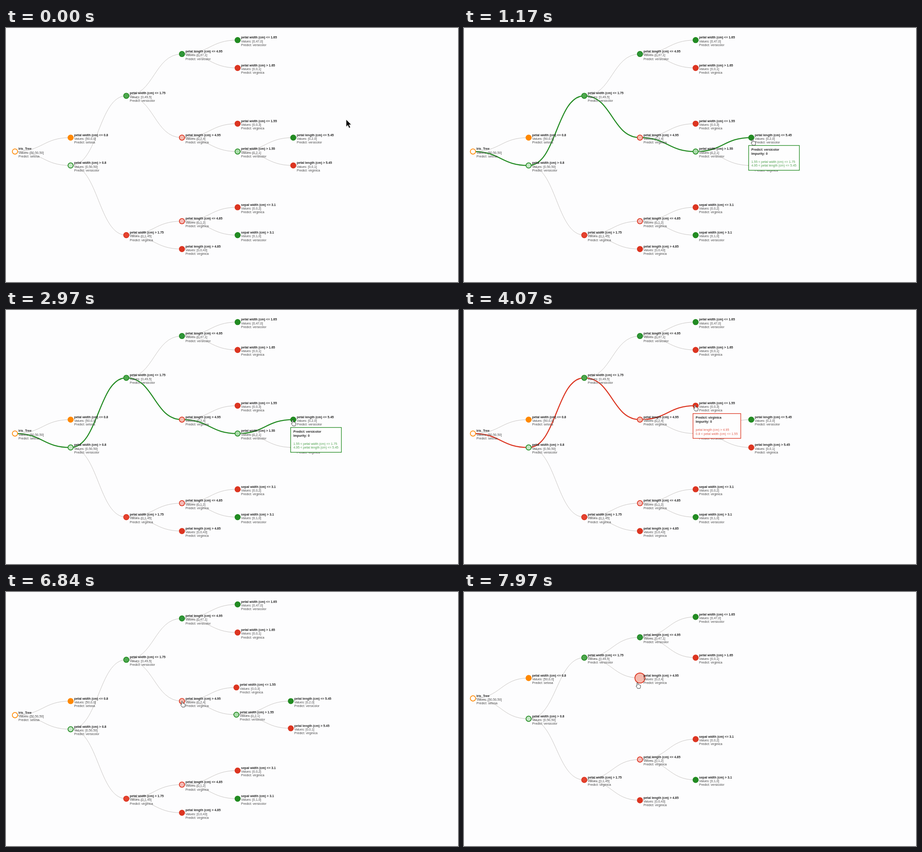
Recreate the animation shown at these times as an HTML page. Size 998 by 561 pixels, loop 8000 ms.

```html
<!DOCTYPE html>
<html lang="en">
<head>
<meta charset="utf-8">
<title>Decision tree</title>
<style>
  html, body { margin: 0; width: 100%; height: 100%; overflow: hidden; background: #fdfdfe; }
  svg { display: block; width: 100%; height: 100%; }
  text { font: 7px "Liberation Sans", Arial, sans-serif; fill: #484848; white-space: pre; }
  .b { font-weight: bold; fill: #222; }
  .link { fill: none; stroke: #c9c6c4; stroke-width: 1; }
</style>
</head>
<body>
<svg id="stage" viewBox="0 0 998 561" preserveAspectRatio="none"></svg>
<script>
const LOOP = 8000, CLICK = 6708, FOLD = 750;
const GREEN = '#228b22', RED = '#dc3521', ORANGE = '#ff8800';
const COLORS = { setosa: ORANGE, versicolor: GREEN, virginica: RED };
const stage = document.getElementById('stage');

function add(parent, tag, attrs = {}, text) {
  const el = document.createElementNS('http://www.w3.org/2000/svg', tag);
  set(el, attrs);
  if (text) el.textContent = text;
  parent.appendChild(el);
  return el;
}
function set(el, attrs) {
  for (const k in attrs) el.setAttribute(k, attrs[k]);
}

// parent, depth, row when open, row when folded, title, values, class, fill (none = leaf)
const nodes = [
  [-1, 0, 8, 4, 'Iris_Tree', '50,50,50', 'setosa', '#ffffff'],
  [0, 1, 7, 3, 'petal width (cm) <= 0.8', '50,0,0', 'setosa'],
  [0, 1, 9, 5, 'petal width (cm) > 0.8', '0,50,50', 'versicolor', '#c4e6c4'],
  [2, 2, 4, 2, 'petal width (cm) <= 1.75', '0,49,5', 'versicolor', '#4fa84f'],
  [2, 2, 14, 8, 'petal width (cm) > 1.75', '0,1,45', 'virginica', '#e5432f'],
  [3, 3, 1, 1, 'petal length (cm) <= 4.95', '0,47,1', 'versicolor', '#2f953a'],
  [3, 3, 7, 3, 'petal length (cm) > 4.95', '0,2,4', 'virginica', '#f5baae'],
  [4, 3, 13, 7, 'petal length (cm) <= 4.85', '0,1,2', 'virginica', '#f5bab6'],
  [4, 3, 15, 9, 'petal length (cm) > 4.85', '0,0,43', 'virginica'],
  [5, 4, 0, 0, 'petal width (cm) <= 1.65', '0,47,0', 'versicolor'],
  [5, 4, 2, 2, 'petal width (cm) > 1.65', '0,0,1', 'virginica'],
  [6, 4, 6, 3, 'petal width (cm) <= 1.55', '0,0,3', 'virginica'],
  [6, 4, 8, 3, 'petal width (cm) > 1.55', '0,2,1', 'versicolor', '#aadcaa'],
  [7, 4, 12, 6, 'sepal width (cm) <= 3.1', '0,0,2', 'virginica'],
  [7, 4, 14, 8, 'sepal width (cm) > 3.1', '0,1,0', 'versicolor'],
  [12, 5, 7, 3, 'petal length (cm) <= 5.45', '0,2,0', 'versicolor'],
  [12, 5, 9, 3, 'petal length (cm) > 5.45', '0,0,1', 'virginica']
].map(([up, depth, row, folded, title, values, kind, fill]) =>
  ({ up, depth, row, folded, title, values, kind, fill, color: COLORS[kind] }));

const folding = nodes[6];
const rules = new Map([
  [nodes[15], { w: 112, lines: ['1.55 < petal width (cm) <= 1.75', '4.95 < petal length (cm) <= 5.45'] }],
  [nodes[11], { w: 105.5, lines: ['petal length (cm) > 4.95', '0.8 < petal width (cm) <= 1.55'] }]
]);

const linkLayer = add(stage, 'g'), nodeLayer = add(stage, 'g');
for (const n of nodes) {
  n.parent = nodes[n.up];
  n.exits = !!n.parent && (n.parent === folding || n.parent.exits);
  if (n.parent) n.link = add(linkLayer, 'path', { class: 'link' });
  n.g = add(nodeLayer, 'g');
  n.dot = add(n.g, 'circle', { fill: n.fill || n.color, stroke: n.color, 'stroke-width': 1.7 });
  n.label = add(n.g, 'g');
  add(n.label, 'text', { x: 7.7, y: -3.4, class: 'b' }, n.title);
  add(n.label, 'text', { x: 7.7, y: 4.9 }, `Values: [${n.values}]`);
  add(n.label, 'text', { x: 7.7, y: 13.1 }, 'Predict: ' + n.kind);
}

for (const [n, tip] of rules) {
  tip.g = add(stage, 'g');
  add(tip.g, 'rect', { x: -5.8, y: 17.4, width: tip.w, height: 54.8, fill: '#fefefe', stroke: n.color, 'stroke-width': 1.3 });
  add(tip.g, 'text', { x: 0.2, y: 29, class: 'b' }, 'Predict: ' + n.kind);
  add(tip.g, 'text', { x: 0.2, y: 37.8, class: 'b' }, 'Impurity: 0');
  tip.lines.forEach((s, i) =>
    add(tip.g, 'text', { x: 0.2, y: 55.6 + i * 8.8, style: `fill:${n.color};fill-opacity:.8` }, s));
}

const arrow = add(stage, 'path', {
  d: 'M0 0V16.2L3.8 12.8L6.4 19L9.4 17.7L6.8 11.7H11.6Z',
  fill: '#0a0a0a', stroke: '#fff', 'stroke-width': 0.8
});
const hand = add(stage, 'path', {
  d: 'M-1.2 7.6V.8Q0-.9 1.2.8V4.6Q2.6 3.8 3.4 5Q4.8 4.4 5.4 5.6Q6.8 5.4 6.8 7V9.4Q6.6 11 5.6 13H.2Q-1.2 10.6-3 8.4Q-3 6.6-1.2 7.6Z',
  fill: '#fff', stroke: '#222', 'stroke-width': 0.9, 'stroke-linejoin': 'round'
});

const route = [
  [0, 751, 202], [450, 751, 202], [950, 637, 246], [1500, 637, 246], [2100, 633, 243],
  [3150, 633, 243], [3550, 510, 210], [4750, 510, 210], [5400, 458, 248], [5950, 458, 248],
  [6450, 388, 241], [6750, 388, 241], [7100, 392, 242], [7350, 392, 242], [7900, 383, 200], [LOOP, 383, 200]
];
const mix = (a, b, p) => a + (b - a) * p;
const clamp = v => Math.max(0, Math.min(1, v));
const cubic = p => p < 0.5 ? 4 * p ** 3 : 1 - 4 * (1 - p) ** 3;

function pointer(t) {
  let i = 1;
  while (i < route.length - 1 && route[i][0] < t) i++;
  const a = route[i - 1], b = route[i];
  const u = clamp((t - a[0]) / (b[0] - a[0]));
  const p = u * u * (3 - 2 * u);
  return [mix(a[1], b[1], p), mix(a[2], b[2], p)];
}

function render(t) {
  const p = cubic(clamp((t - CLICK) / FOLD));
  for (const n of nodes) {
    const x = 19.8 + 122.9 * n.depth;
    n.x = n.exits ? mix(x, 19.8 + 122.9 * folding.depth, p) : x;
    n.y = mix(26.7 + 30.77 * n.row, 55 + 45 * n.folded, p);
    n.r = n.exits ? 5.8 * (1 - p) : n === folding ? mix(5.8, 11.2, p) : 5.8;
    set(n.g, { transform: `translate(${n.x} ${n.y})`, display: n.exits && p === 1 ? 'none' : 'inline' });
    set(n.dot, { r: n.r, 'stroke-width': n.exits ? 1.7 * (1 - p) : 1.7 });
    if (n.exits) set(n.label, { opacity: 1 - p });
  }

  const [mx, my] = pointer(t);
  const over = nodes.find(n => !(n.exits && p > 0) && Math.hypot(n.x - mx, n.y - my) < n.r + 0.8);
  const leaf = rules.has(over) ? over : null;
  const lit = new Set();
  for (let n = leaf; n; n = n.parent) lit.add(n);

  for (const n of nodes) {
    if (!n.link) continue;
    const a = n.parent, m = (a.x + n.x) / 2;
    set(n.link, {
      d: `M${a.x} ${a.y}C${m} ${a.y} ${m} ${n.y} ${n.x} ${n.y}`,
      display: n.exits && p === 1 ? 'none' : 'inline',
      style: lit.has(n) ? `stroke:${leaf.color};stroke-width:2.3` : ''
    });
  }
  for (const [n, tip] of rules)
    set(tip.g, { transform: `translate(${n.x} ${n.y})`, display: n === leaf ? 'inline' : 'none' });

  const at = `translate(${mx} ${my})`;
  set(arrow, { transform: at, display: over ? 'none' : 'inline' });
  set(hand, { transform: at, display: over ? 'inline' : 'none' });
}

const start = performance.now();
function tick(now) {
  render(Math.max(0, now - start) % LOOP);
  requestAnimationFrame(tick);
}
render(0);
requestAnimationFrame(tick);
</script>
</body>
</html>
```
